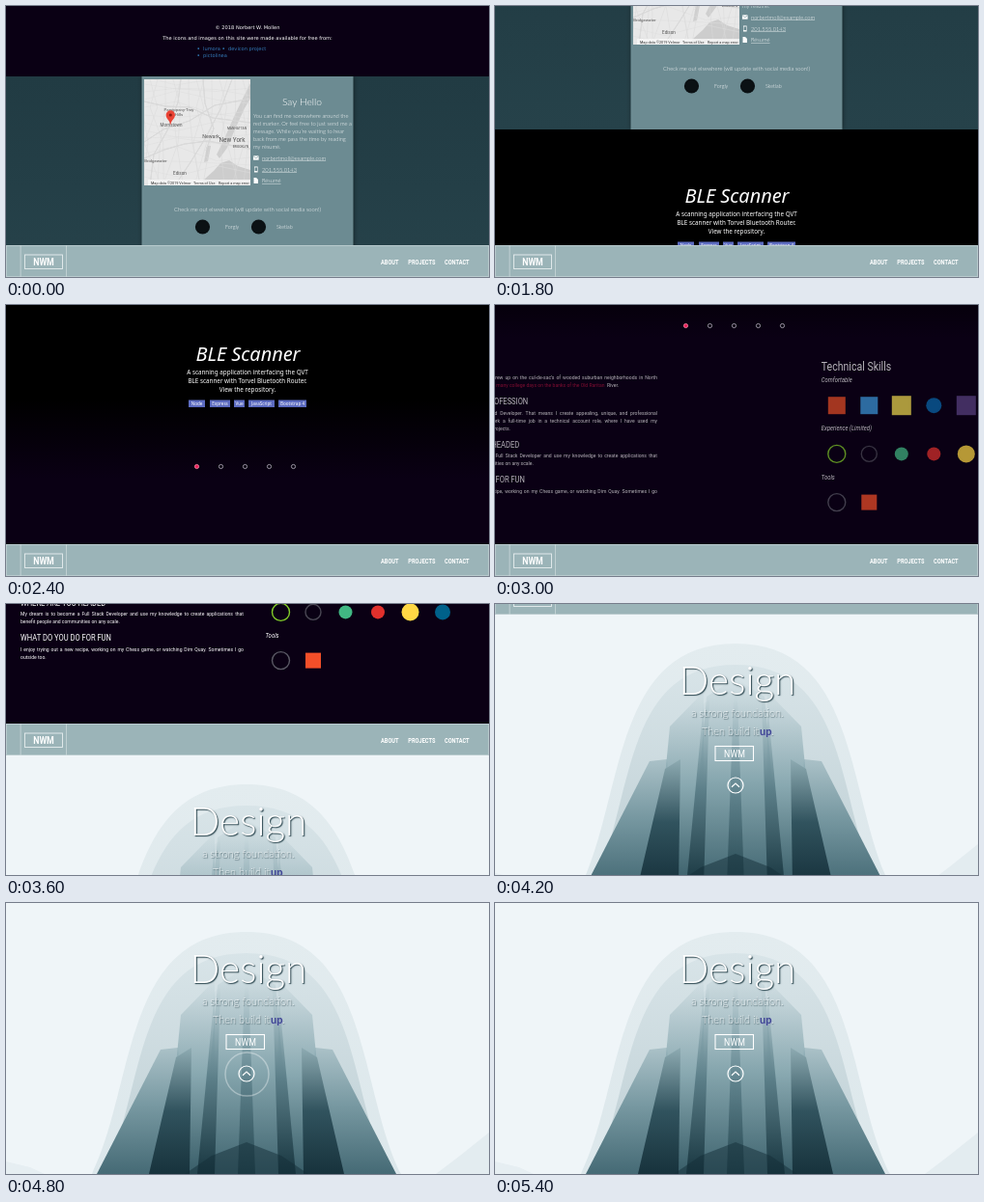
These frames come from a looping animation (500 by 281 pixels, 6 s). An HTML page with a canvas:

```html
<!DOCTYPE html>
<html lang="en">
<head>
<meta charset="utf-8">
<title>Portfolio scroll</title>
<style>
html, body { margin: 0; width: 100%; height: 100%; overflow: hidden; background: #0a0014; }
canvas { display: block; width: 500px; height: 281px; }
</style>
</head>
<body>
<canvas id="stage"></canvas>
<script>
const W = 500, H = 281, LOOP = 6000, STEP = 600, JUMP = 146, END = 741;
const NAV_Y = 708, NAV_H = 33;
const DARK = '#0a0014', LATO = 'Lato, sans-serif', ROBOTO = 'Roboto, sans-serif';
const NARROW = 0.88;
const canvas = document.getElementById('stage');
const ctx = canvas.getContext('2d');
const dpr = window.devicePixelRatio || 1;
canvas.width = W * dpr;
canvas.height = H * dpr;

function rect(x, y, w, h, fill) {
  ctx.fillStyle = fill;
  ctx.fillRect(x, y, w, h);
}
function frame(x, y, w, h, color, line = 1) {
  ctx.strokeStyle = color;
  ctx.lineWidth = line;
  ctx.strokeRect(x, y, w, h);
}
function path(points, closed) {
  ctx.beginPath();
  points.forEach(([x, y]) => ctx.lineTo(x, y));
  if (closed) ctx.closePath();
}
function poly(points, fill) {
  path(points, true);
  ctx.fillStyle = fill;
  ctx.fill();
}
function line(points, color, width) {
  path(points);
  ctx.strokeStyle = color;
  ctx.lineWidth = width;
  ctx.stroke();
}
function disc(x, y, r, fill, stroke, width = 1) {
  ctx.beginPath();
  ctx.arc(x, y, r, 0, Math.PI * 2);
  if (fill) { ctx.fillStyle = fill; ctx.fill(); }
  if (stroke) { ctx.strokeStyle = stroke; ctx.lineWidth = width; ctx.stroke(); }
}
function fade(y0, y1, ...colors) {
  const g = ctx.createLinearGradient(0, y0, 0, y1);
  colors.forEach((c, i) => g.addColorStop(i / (colors.length - 1), c));
  return g;
}
function text(s, x, y, font, color, align = 'left') {
  ctx.font = font;
  ctx.fillStyle = color;
  ctx.textAlign = align;
  ctx.fillText(s, x, y);
}
// Roboto set in a condensed cut; justified when a column width is given
function narrow(s, x, y, style, color, align, column) {
  ctx.save();
  ctx.translate(x, y);
  ctx.scale(NARROW, 1);
  ctx.font = style + ' ' + ROBOTO;
  if (column) {
    const gap = (column / NARROW - ctx.measureText(s).width) / (s.split(' ').length - 1);
    ctx.wordSpacing = gap + 'px';
  }
  text(s, 0, 0, style + ' ' + ROBOTO, color, align);
  ctx.restore();
}

function credits() {
  const font = '5.1px "DejaVu Sans", sans-serif', link = '#337ab7';
  rect(0, 0, W, 73, DARK);
  text('© 2018 Norbert W. Mollen', 250, 24, font, '#fff', 'center');
  text('The icons and images on this site were made available for free from:', 250, 35, font, '#fff', 'center');
  [['lumora', 204, 46], ['devicon project', 230, 46], ['pictolinea', 204, 53]].forEach(([s, x, y]) => {
    disc(x - 4.8, y - 1.9, 0.9, link);
    text(s, x, y, font, link);
  });
}

function map() {
  ctx.save();
  ctx.beginPath();
  ctx.rect(143, 76, 110, 110);
  ctx.clip();
  rect(143, 76, 110, 110, '#e8e8e8');
  poly([[253, 80], [244, 98], [235, 117], [225, 140], [218, 154], [221, 158], [229, 147], [237, 128], [247, 106], [253, 96]], '#cfcfcf');
  poly([[205, 180], [215, 171], [222, 163], [231, 160], [240, 166], [253, 170], [253, 186], [200, 186]], '#cdcdcd');
  poly([[208, 145], [212, 145], [209, 161], [205, 162]], '#cfcfcf');
  for (let i = 0; i < 15; i++) {
    const x = 141 + i * 8;
    line([[x, 76], [x + 9 * Math.sin(i * 2.1), 105], [x + 6 * Math.cos(i * 3), 142], [x + 12 * Math.sin(i * 1.3), 186]], '#d9d9d9', 0.5);
    line([[143, x - 68], [176, x - 68 + 9 * Math.cos(i)], [218, x - 66 + 6 * Math.sin(i * 2)], [253, x - 64]], '#dcdcdc', 0.5);
  }
  [
    [[143, 99], [165, 104], [190, 105], [214, 116], [253, 121]],
    [[143, 158], [164, 149], [185, 143], [209, 140], [253, 148]],
    [[181, 76], [178, 100], [167, 129], [153, 154], [149, 186]],
    [[234, 76], [222, 107], [207, 136], [191, 162], [175, 186]],
    [[143, 141], [163, 128], [190, 119], [216, 103], [253, 96]],
    [[204, 76], [206, 101], [215, 127], [207, 150]]
  ].forEach(p => { line(p, '#bdbdbd', 1); line(p, '#f8f8f8', 0.5); });
  [
    ['Parsippany-Troy', 179, 109, 4.3], ['Hills', 179, 113.5, 4.3], ['Morristown', 171, 125, 4.5],
    ['Newark', 212, 136.5, 5.2], ['New York', 234, 141, 6.4], ['MANHATTAN', 239, 127.5, 3.3],
    ['BROOKLYN', 243, 146.5, 3.3], ['Bridgewater', 155, 161.5, 4.4], ['Edison', 180, 174.5, 4.6]
  ].forEach(([s, x, y, size]) => text(s, x, y, size + 'px ' + ROBOTO, '#555', 'center'));
  ctx.beginPath();
  ctx.moveTo(170.3, 123.5);
  ctx.bezierCurveTo(169.5, 118, 165.6, 117, 165.6, 113);
  ctx.arc(170.3, 113, 4.7, Math.PI, 0);
  ctx.bezierCurveTo(175, 117, 171, 118, 170.3, 123.5);
  ctx.fillStyle = '#ea4335';
  ctx.fill();
  disc(170.3, 113, 1.6, '#8c1a11');
  rect(147, 180, 106, 6, 'rgba(247,247,247,.85)');
  [['Map data ©2019 Velmor', 150], ['Terms of Use', 194], ['Report a map error', 220]]
    .forEach(([s, x]) => text(s, x, 184.5, '3.8px ' + ROBOTO, '#333'));
  ctx.restore();
}

function contact() {
  const body = '300 5.75px ' + LATO;
  rect(0, 73, W, 201, fade(73, 274, '#213b43', '#26424a'));
  ctx.save();
  ctx.beginPath();
  ctx.rect(0, 73, W, 201);
  ctx.clip();
  ctx.shadowColor = 'rgba(0,0,0,.6)';
  ctx.shadowBlur = 5 * dpr;
  rect(140.5, 73, 219, 201, '#6c8b92');
  ctx.restore();
  map();
  text('Say Hello', 306.5, 103, '300 10.2px ' + LATO, '#fff', 'center');
  [
    'You can find me somewhere around the', 'red marker. Or feel free to just send me a',
    'message. While you’re waiting to hear', 'back from me pass the time by reading', 'my résumé.'
  ].forEach((s, i) => text(s, 256, 116 + i * 8.05, body, '#fff'));
  ['norbertmoll@example.com', '201.555.0143', 'Résumé'].forEach((s, i) => {
    const y = 159.7 + i * 11.8;
    text(s, 265, y, body, '#fff');
    rect(265, y + 0.9, ctx.measureText(s).width, 0.4, '#fff');
  });
  rect(256, 155.3, 5.6, 4.4, '#fff');
  line([[256, 155.7], [258.8, 157.8], [261.6, 155.7]], '#6c8b92', 0.6);
  rect(257, 166.5, 3.6, 6, '#fff');
  rect(257.5, 167.4, 2.6, 3.7, '#6c8b92');
  poly([[256.5, 178], [259, 178], [261, 180], [261, 184], [256.5, 184]], '#fff');
  text('Check me out elsewhere (will update with social media soon!)', 250, 213, body, '#fff', 'center');
  disc(203.5, 229, 7.6, '#0b1114');
  disc(261.5, 229, 7.6, '#0b1114');
  text('Forgly', 227, 231, '300 5.4px ' + LATO, '#fff');
  text('Sketlab', 280, 231, '300 5.4px ' + LATO, '#fff');
}

function projects() {
  const sans = '"Noto Sans", sans-serif';
  rect(0, 274, W, 198, fade(390, 472, '#000', DARK));
  text('BLE Scanner', 250.5, 350, 'italic 19.9px ' + sans, '#fff', 'center');
  ['A scanning application interfacing the QVT', 'BLE scanner with Torvel Bluetooth Router.', 'View the repository.']
    .forEach((s, i) => text(s, 250, 363.8 + i * 9.1, '6.3px ' + sans, '#fff', 'center'));
  [['Node', 189, 17], ['Express', 211, 21], ['Vue', 236, 11], ['JavaScript', 251, 27], ['Bootstrap 4', 282, 29]]
    .forEach(([s, x, w]) => {
      rect(x, 390.5, w, 7.5, '#5c6bc0');
      text(s, x + w / 2, 395.8, '4.6px ' + sans, '#fff', 'center');
    });
  for (let i = 0; i < 5; i++) {
    disc(197.5 + 25 * i, 459.5, 2.1, i ? null : '#e91e56', i ? '#b9b5c0' : '#ff8fae', 0.8);
  }
}

function story(dx) {
  const body = '5.75px', x = 15 + dx;
  [
    ['Thanks for stopping by. I grew up on the cul-de-sac’s of wooded suburban neighborhoods in North', 77.3, 1],
    ['I am currently a Front End Developer. That means I create appealing, unique, and professional', 114.3, 1],
    ['websites. Today I also work a full-time job in a technical account role, where I have used my', 122.3, 1],
    ['skills to help ship multiple projects.', 130.3],
    ['My dream is to become a Full Stack Developer and use my knowledge to create applications that', 158.4, 1],
    ['benefit people and communities on any scale.', 166.4],
    ['I enjoy trying out a new recipe, working on my Chess game, or watching Dim Quay. Sometimes I go', 195.2, 1],
    ['outside too.', 203.2]
  ].forEach(([s, y, full]) => narrow(s, x, 438 + y, body, '#fff', 'left', full && 231));
  narrow('Jersey, with many college days on the banks of the Old Raritan', x + 176.5, 523.3, body, '#b3123f', 'right');
  narrow('River.', x + 179, 523.3, body, '#fff', 'left');
  [['WHAT IS YOUR PROFESSION', 103], ['WHERE ARE YOU HEADED', 147.6], ['WHAT DO YOU DO FOR FUN', 184]]
    .forEach(([s, y]) => narrow(s, x, 438 + y, '8.6px', '#fff', 'left'));
}

function skills(dx) {
  const x = 268.5 + dx;
  narrow('Technical Skills', x, 506.3, '12px', '#fff', 'left');
  ['Comfortable', 'Experience (Limited)', 'Tools']
    .forEach((s, i) => narrow(s, x, 518.2 + i * 50.2, 'italic 6.7px', '#fff', 'left'));
  const square = (i, row, side, color) =>
    rect(x + 16 + 33.5 * i - side / 2, 542.2 + row * 50.2 - side / 2, side, side, color);
  const round = (i, row, r, color, hollow) =>
    disc(x + 16 + 33.5 * i, 542.2 + row * 50.2, r, hollow ? null : color, hollow ? color : null, 1.4);
  square(0, 0, 18, '#e44d26');
  square(1, 0, 18, '#3c99dc');
  square(2, 0, 20, '#f0db4f');
  round(3, 0, 8, '#0868ac');
  square(4, 0, 20, '#5b4282');
  round(0, 1, 9, '#83cd29', true);
  round(1, 1, 8, '#4a4754', true);
  round(2, 1, 7, '#41b883');
  round(3, 1, 7, '#e0302c');
  round(4, 1, 9, '#ffd845');
  round(5, 1, 8, '#00618a');
  round(0, 2, 9, '#5a5965', true);
  square(1, 2, 16, '#f34f29');
}

function about(shown) {
  rect(0, 472, W, 269, DARK);
  if (!shown) return;
  ctx.globalAlpha = shown;
  story(-260 * (1 - shown));
  skills(231 * (1 - shown));
  ctx.globalAlpha = 1;
}

function tower() {
  const mirror = p => p.map(([x, y]) => [498 - x, y]);
  const both = (p, fill) => { poly(p, fill); poly(mirror(p), fill); };
  const haze = (top, rx, fill) => {
    ctx.beginPath();
    ctx.moveTo(249 - rx, 281);
    ctx.bezierCurveTo(249 - rx * 0.72, 190, 249 - rx * 0.8, top, 249, top);
    ctx.bezierCurveTo(249 + rx * 0.8, top, 249 + rx * 0.72, 190, 249 + rx, 281);
    ctx.fillStyle = fill;
    ctx.fill();
  };
  poly([[500, 238], [470, 262], [445, 281], [500, 281]], '#e3ecf0');
  poly([[0, 268], [25, 274], [40, 281], [0, 281]], '#e6eef2');
  haze(30, 160, fade(30, 281, '#e3ecef', '#dce7eb'));
  haze(52, 146, fade(52, 240, '#d8e4e8', '#c3d3d8'));
  const clear = 'rgba(150,178,186,0)';
  both([[94, 281], [160, 152], [178, 150], [190, 281]], fade(140, 281, '#b3c8ce', '#7798a1', '#456a75'));
  both([[165, 281], [181, 116], [216, 80], [216, 281]], fade(75, 281, clear, '#88a8b0', '#385d68'));
  both([[148, 281], [176, 160], [192, 150], [190, 281]], fade(150, 281, '#8eabb2', '#31535e', '#17323c'));
  poly([[201, 281], [219, 85], [249, 66], [279, 85], [297, 281]], fade(66, 281, clear, '#86a6ae', '#3f646f'));
  both([[198, 281], [216, 92], [222, 88], [216, 281]], fade(85, 281, clear, '#5b7e88', '#183640'));
  both([[240, 281], [247, 85], [249, 85], [249, 281]], fade(85, 281, clear, '#61848e', '#244650'));
  both([[185, 281], [213, 262], [249, 248], [249, 281]], 'rgba(20,46,56,.5)');
}

function shadowed(s, x, y, font, color, align, shade, off) {
  ctx.shadowColor = shade;
  ctx.shadowOffsetX = ctx.shadowOffsetY = off * dpr;
  ctx.shadowBlur = 1.2 * dpr;
  text(s, x, y, font, color, align);
  ctx.shadowColor = 'transparent';
}

function hero(pulse) {
  ctx.save();
  ctx.translate(0, END);
  ctx.beginPath();
  ctx.rect(0, 0, W, H);
  ctx.clip();
  rect(0, 0, W, H, '#eff5f8');
  tower();
  const small = '300 11px ' + LATO, shade = '#3b555d';
  shadowed('Design', 251, 82.5, '300 40.5px ' + LATO, '#fff', 'center', '#1f3b44', 1);
  shadowed('a strong foundation.', 251, 106, small, '#eef3f5', 'center', shade, 0.6);
  shadowed('Then build it ', 214, 125, small, '#eef3f5', 'left', shade, 0.6);
  shadowed('up', 274, 125, 'bold 11px ' + LATO, '#3f4596', 'left', '#9aa6c4', 0.5);
  shadowed('.', 286, 125, small, '#eef3f5', 'left', shade, 0.6);
  frame(228, 136.5, 39.5, 15, '#fff', 1.1);
  narrow('NWM', 248, 147.7, '10px', '#fff', 'center');
  if (pulse) disc(249.5, 177.5, 22.5, null, 'rgba(255,255,255,.35)', 1.5);
  disc(249, 177, 8, null, '#fff', 1.2);
  line([[245, 178.8], [249, 175], [253, 178.8]], '#fff', 1.2);
  ctx.restore();
}

function nav(y) {
  rect(0, y, W, NAV_H, '#9bb4b8');
  frame(0.5, y + 0.5, W - 1, NAV_H - 1, '#b8cacd');
  rect(14.7, y, 0.8, NAV_H, '#c9d7d9');
  rect(62, y, 0.8, NAV_H, '#c9d7d9');
  frame(19.5, y + 10, 39, 14.5, '#e6eeef', 0.9);
  narrow('NWM', 39, y + 20.7, 'bold 10px', '#fff', 'center');
  [['ABOUT', 388], ['PROJECTS', 416.3], ['CONTACT', 454]]
    .forEach(([s, x]) => narrow(s, x, y + 20.2, 'bold 6.45px', '#fff', 'left'));
}

function draw(now) {
  const step = Math.max(0, Math.floor((now % LOOP) / STEP) - 2);
  const scroll = Math.min(END, step * JUMP);
  const shown = step < 3 ? 0 : step === 3 ? 0.7 : 1;
  ctx.setTransform(dpr, 0, 0, dpr, 0, 0);
  ctx.save();
  ctx.translate(0, -scroll);
  credits();
  contact();
  projects();
  about(shown);
  hero(step === 6);
  ctx.restore();
  nav(Math.min(H - NAV_H, NAV_Y - scroll));
}

let start;
function tick(now) {
  if (start === undefined) start = now;
  draw(now - start);
  requestAnimationFrame(tick);
}
draw(0);
requestAnimationFrame(tick);
</script>
</body>
</html>
```
